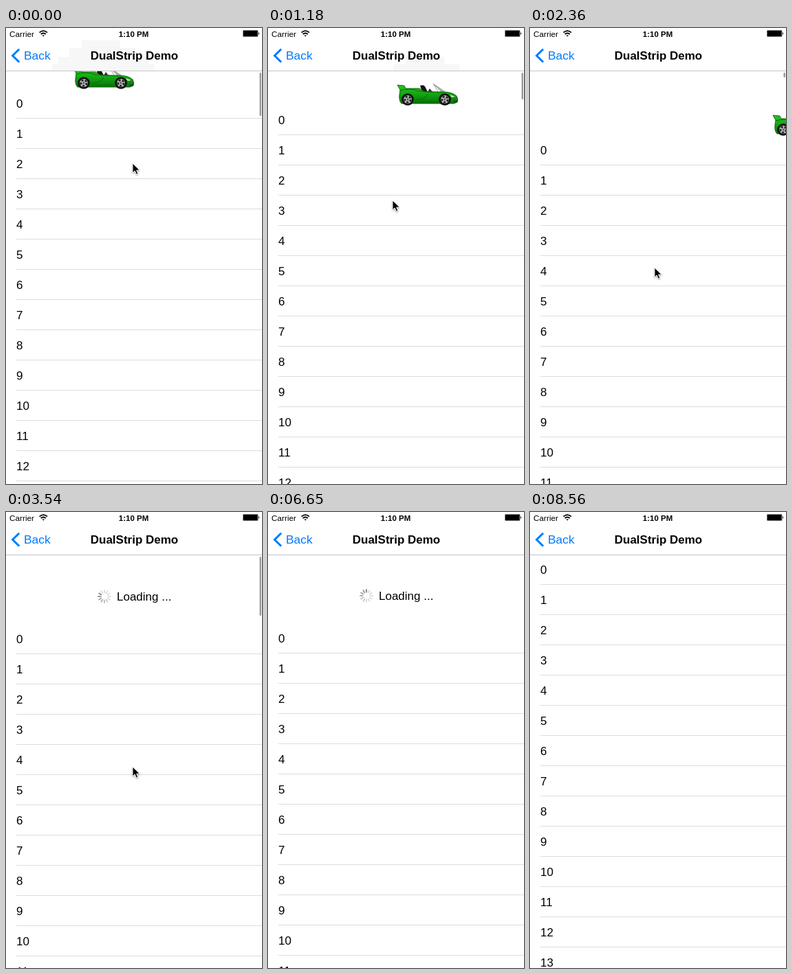
Animation of 372x664 px, one loop 8660 ms. Source, as an HTML page:

```html
<!DOCTYPE html>
<html lang="en">
<head>
<meta charset="utf-8">
<title>Pull to refresh</title>
<style>
  html, body { margin: 0; width: 100%; height: 100%; overflow: hidden; background: #fff; }
  svg { display: block; width: 372px; height: 664px; font: 17px "Liberation Sans", Arial, sans-serif; }
  .status { font-size: 11.8px; }
  .bold { font-weight: bold; }
  .mid { text-anchor: middle; }
</style>
</head>
<body>
<svg viewBox="0 0 372 664">
  <defs>
    <linearGradient id="paint" x2="0" y2="1">
      <stop offset="0" stop-color="#2cc32a"/>
      <stop offset=".5" stop-color="#12a512"/>
      <stop offset="1" stop-color="#087208"/>
    </linearGradient>
    <g id="wheel">
      <circle r="8.8" fill="#111"/>
      <circle r="5.9" fill="#b9b9b9"/>
      <circle r="4.1" fill="none" stroke="#222" stroke-width="2.8" stroke-dasharray="3 2.15"/>
      <circle r="1.4" fill="#555"/>
    </g>
  </defs>
  <rect width="372" height="664" fill="#fff"/>
  <g id="list"></g>
  <g id="loader">
    <g id="spinner" transform="translate(143)" stroke-width="2" stroke-linecap="round"></g>
    <text x="161" y="6">Loading ...</text>
  </g>
  <g id="car">
    <path d="M33 4q5-2 7 1l4 8h-8z" fill="#151515"/>
    <path d="M44 13l3-5 4 5z" fill="#333"/>
    <path d="M52 1l19 13h-6z" fill="#a9b5b0" stroke="#888" stroke-width=".7"/>
    <path d="M52 .7l7 12" stroke="#999" fill="none"/>
    <path d="M0 3l10 1 2 4h20l8 5h25q15 0 21 6 3 5 1 9l-5 2H6q-4-4-3-13l1-7z" fill="url(#paint)" stroke="#086008" stroke-width=".9"/>
    <path d="M4 11q15-4 28 1l34 2M26 25q16-2 18-9M30 27h29" fill="none" stroke="#0a6b0a"/>
    <path d="M76 17l8 3-5 1z" fill="#d7e8d4"/>
    <path d="M82 26l5-1v3l-5 1z" fill="#243"/>
    <use href="#wheel" x="15" y="24"/>
    <use href="#wheel" x="69" y="24"/>
  </g>
  <rect width="372" height="62" fill="#fff"/>
  <svg width="372" height="62"><g id="ghost" fill="#f7f7f7"></g></svg>
  <rect y="62" width="372" height="1" fill="#c4c4c6"/>
  <text class="status" x="5" y="12.5" textLength="">Carrier</text>
  <g fill="none" stroke="#000" stroke-width="1.8">
    <path d="M48.6 6.6q5.7-5 11.4 0M50.7 9q3.6-3 7.2 0"/>
    <path d="M52.4 10.4h3.8l-1.9 2.2z" fill="#000" stroke="none"/>
  </g>
  <text class="status bold mid" x="185.5" y="12.5" style="font-size:11.5px">1:10 PM</text>
  <rect x="344.5" y="3.5" width="21.5" height="9" rx="1" fill="#000" stroke="#777"/>
  <path d="M367 6q2 2 0 4z"/>
  <path d="M19.2 30.7L9.6 40.2l9.6 9.5" fill="none" stroke="#007aff" stroke-width="3"/>
  <text x="26" y="46" fill="#007aff" style="font-size:17.4px">Back</text>
  <text class="bold mid" x="186.5" y="46">DualStrip Demo</text>
  <rect id="bar" x="368.5" y="65" width="2.5" rx="1.2" fill="#9b9b9b"/>
  <path id="cursor" d="M0 0v14l3.2-3 2.4 5.2 2.4-1-2.3-5 4.6-.2z" stroke="#fff" style="filter:drop-shadow(0 1px 1px #0006)"/>
</svg>
<script>
const LOOP = 8660, STEP = 147.8, LEAD = 17;
const $ = id => document.getElementById(id);

// Pull distance by step
const PULL = [[0, 26], [2, 29], [4, 34], [8, 50], [11, 65], [16, 94], [18, 101], [20, 104], [23, 104],
  [24, 101], [25, 100], [53, 100], [54, 84], [55, 48], [56, 15], [57, 2], [58, 0]];
const CURSOR_X = [[0, 184], [4, 182], [11, 180], [16, 181], [20, 184], [32, 184], [37, 339]];
const CURSOR_Y = [[32, 371], [34, 455], [37, 650]];

function track(keys, k) {
  const i = keys.findIndex(p => p[0] >= k);
  if (i < 0) return keys[keys.length - 1][1];
  if (i === 0) return keys[0][1];
  const [k0, a] = keys[i - 1], [k1, b] = keys[i];
  return a + (b - a) * (k - k0) / (k1 - k0);
}

const repeat = (n, make) => Array.from({ length: n }, (_, i) => make(i)).join('');

$('list').innerHTML = repeat(15, i =>
  `<text x="15" y="${i * 44 + 28}">${i}</text>
   <rect x="15" y="${i * 44 + 43}" width="357" height="1" fill="#dcdcde"/>`);

$('spinner').innerHTML = repeat(12, i => `<path d="M0-5.4V-9" transform="rotate(${i * 30})"/>`);
const spokes = [...$('spinner').children];

$('ghost').innerHTML = [[12, 68, -38], [-6, 90, -27], [-22, 108, -14], [-31, 118, -4]]
  .map(([l, r, y]) => `<rect x="${l}" y="${y}" width="${r - l}" height="50"/>`).join('');

const move = (id, x, y) => $(id).setAttribute('transform', `translate(${x} ${y})`);
const show = (id, on) => $(id).setAttribute('visibility', on ? 'visible' : 'hidden');

function draw(k) {
  const d = Math.round(track(PULL, k)), loading = k >= 24;
  const carX = Math.round(d * 3.76);

  move('list', 0, d + 62);
  move('loader', 0, d + 22);
  move('car', carX, d + 30);
  move('ghost', carX, d + 30);
  show('loader', loading);
  show('car', !loading);
  show('ghost', !loading);

  const head = 10 + Math.floor(1.81 * (k - 24));
  spokes.forEach((s, i) => {
    const age = (((head - i) % 12) + 12) % 12;
    const g = Math.min(222, 140 + age * 13);
    s.setAttribute('stroke', `rgb(${g},${g},${g})`);
  });

  $('bar').setAttribute('height', loading ? 187 - d : Math.max(7, 89 - d));
  $('bar').setAttribute('opacity', Math.max(0, Math.min(1, (28 - k) / 2)));

  const y = loading ? track(CURSOR_Y, k) : 197 + (d - 26) * 2.24;
  move('cursor', Math.round(track(CURSOR_X, k)), Math.round(y));
  show('cursor', k <= 37);
}

function tick() {
  const t = performance.now() % LOOP;
  draw(Math.min(58, Math.floor((t + LEAD) / STEP)));
  requestAnimationFrame(tick);
}
tick();
</script>
</body>
</html>
```
